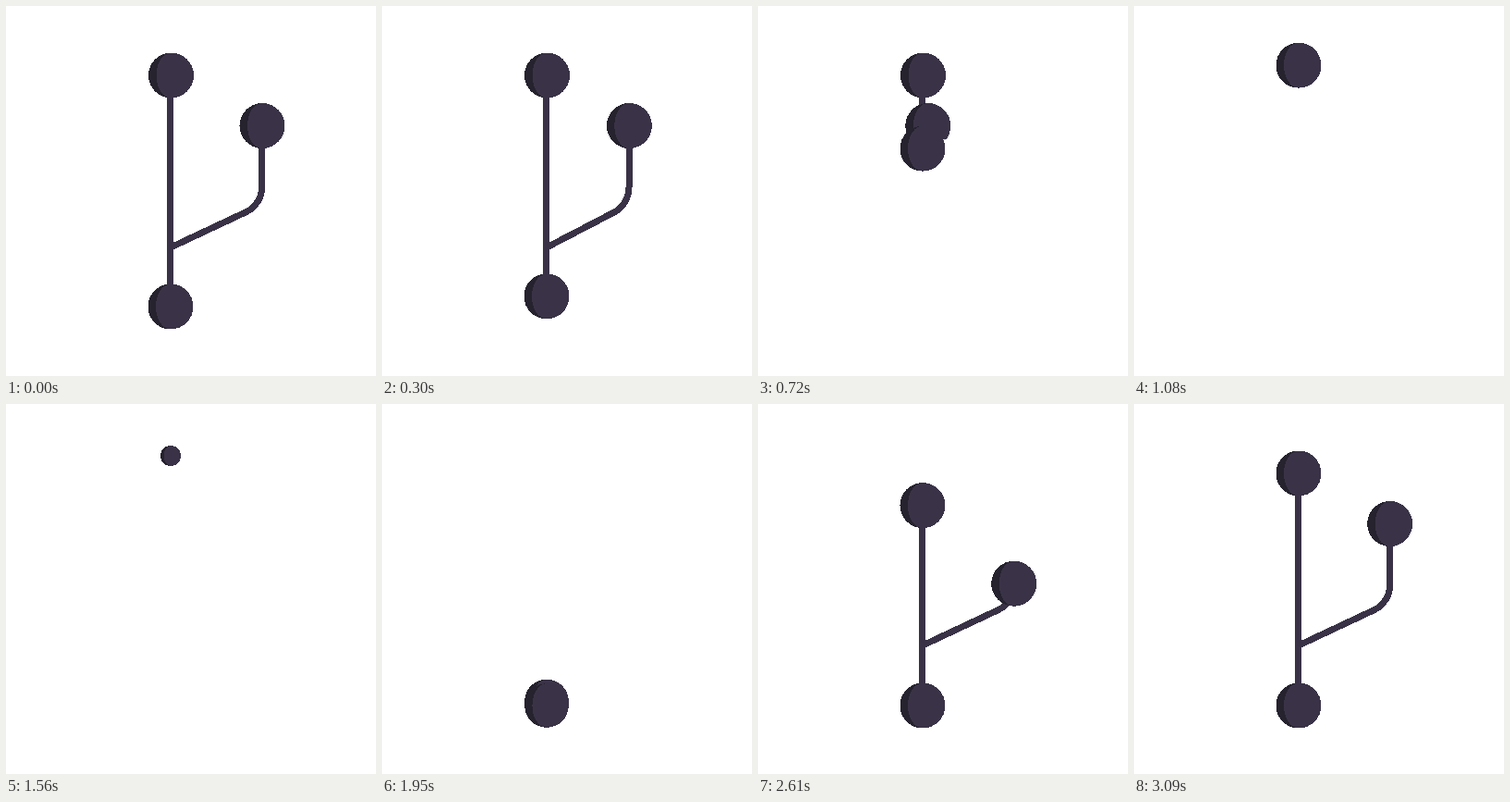
An HTML page that plays this animation: 400x400 px, repeating every 3.12 s.

```html
<!DOCTYPE html>
<html>
<head>
<meta charset="utf-8">
<style>
html, body { margin: 0; width: 100%; height: 100%; overflow: hidden; background: #fff; }
svg { display: block; width: 100%; height: 100%; shape-rendering: crispEdges; }
.line { fill: none; stroke: #393246; stroke-width: 7; }
</style>
</head>
<body>
<svg viewBox="0 0 400 400">
  <defs>
    <g id="disc">
      <circle r="24.5" fill="#3a3347"/>
      <path d="M0-24.5A24.5 24.5 0 0 0 0 24.5A16 24.5 0 0 1 0-24.5" fill="#26222e"/>
    </g>
    <clipPath id="wipe"><rect id="window" width="400" height="400"/></clipPath>
  </defs>
  <g clip-path="url(#wipe)">
    <path id="trunk" class="line"/>
    <path id="branch" class="line"/>
    <use id="side" href="#disc"/>
    <use id="top" href="#disc"/>
  </g>
  <use id="base" href="#disc"/>
</svg>
<script>
const LOOP = 3120;
const $ = id => document.getElementById(id);
const [trunk, branch, topDisc, side, base, view] =
  ['trunk', 'branch', 'top', 'side', 'base', 'window'].map($);

const clamp = v => Math.min(1, Math.max(0, v));
const mix = (a, b, k) => a + (b - a) * k;
const smooth = k => k * k * (3 - 2 * k);
const progress = (t, start, length) => clamp((t - start) / length);

// Ease along cubic-bezier(a, 0, b, 1)
function ease(x, a = 0.75, b = 0.25) {
  let lo = 0, hi = 1;
  for (let i = 0; i < 24; i++) {
    const u = (lo + hi) / 2, v = 1 - u;
    if (3 * v * v * u * a + 3 * v * u * u * b + u ** 3 < x) lo = u; else hi = u;
  }
  return smooth((lo + hi) / 2);
}

function place(disc, x, y, scale = 1) {
  disc.setAttribute('transform', `translate(${x} ${y}) scale(${scale})`);
}

function setTrunk(from, to) {
  trunk.setAttribute('d', `M177.5 ${from}V${to}`);
}

// Branch squeezed sideways towards the trunk
function setBranch(k) {
  const x = d => 178 + d * k;
  branch.setAttribute('d',
    `M178 261L${x(82)} 222.5C${x(92)} 217.5 ${x(98.7)} 207 ${x(98.7)} 196V129.5`);
}

function collapse(t) {
  const y = mix(325, 56, ease(progress(t, 0, 1345)));
  const k = 1 - ease(progress(t, 0, 960));
  view.setAttribute('height', y - 10);
  setTrunk(75, Math.max(75, y));
  setBranch(k);
  branch.style.strokeDasharray = 'none';
  place(topDisc, 178.5, 75);
  place(side, 178.5 + 98.5 * k, 129.5);
  place(base, 178, y, 1 - smooth(progress(t, 1380, 340)));
}

function grow(t) {
  const scale = smooth(progress(t, 1690, 290));
  const y = mix(326, 75, ease(progress(t, 1737, 1350)));
  const k = ease(progress(t, 2270, 720), 0.5, 0.25);
  view.setAttribute('height', 400);
  setTrunk(y, 326);
  setBranch(1);
  const length = branch.getTotalLength();
  const tip = branch.getPointAtLength(length * k);
  branch.style.strokeDasharray = `${length * k} 999`;
  place(topDisc, 178, y, scale);
  place(side, tip.x, tip.y, t > 2270 ? 1 : 0);
  place(base, 178, 326, scale);
}

function frame() {
  const t = performance.now() % LOOP;
  (t < 1690 ? collapse : grow)(t);
  requestAnimationFrame(frame);
}
frame();
</script>
</body>
</html>
```
